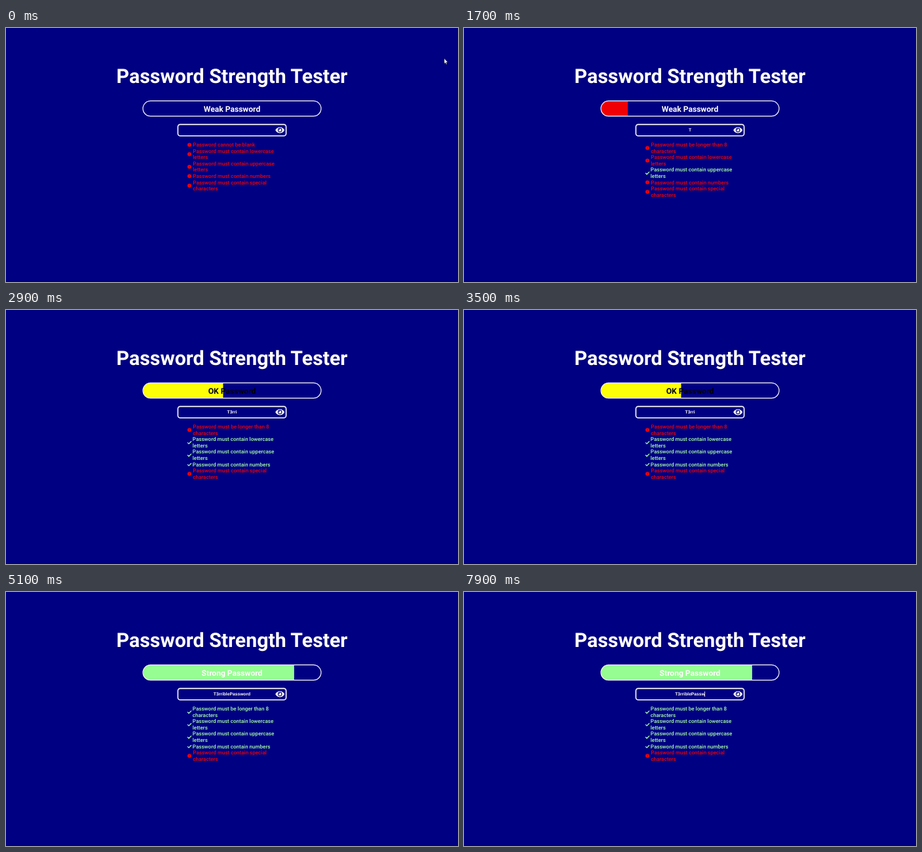
Animation, 690 px wide and 388 px high, one loop 8000 ms. Source, as an HTML page with a canvas:

```html
<!DOCTYPE html>
<html lang="en">
<head>
<meta charset="utf-8">
<title>Password Strength Tester</title>
<style>
html, body { margin: 0; width: 100%; height: 100%; overflow: hidden; background: #000082; }
canvas { display: block; width: 690px; height: 388px; }
</style>
</head>
<body>
<canvas id="stage" width="690" height="388"></canvas>
<script>
const ctx = document.getElementById('stage').getContext('2d');
ctx.textRendering = 'geometricPrecision';
const LOOP = 8000, MID = 345;
const NAVY = '#000082', WHITE = '#fffffa', RED = '#f00004', YELLOW = '#fdff08', GREEN = '#96fd92', MINT = '#a8ffa8';
const ROBOTO = 'Roboto, sans-serif', ARIAL = '"Liberation Sans", Arial, sans-serif';

// Each entry: time and number of characters in the field.
const PHRASE = 'T3rriblePassword';
const KEYS = [[0, 0], [1500, 1], [2200, 2], [2600, 3], [2700, 4], [2900, 5], [3700, 6], [3800, 7],
  [3900, 8], [4100, 9], [4300, 12], [4500, 13], [4700, 14], [4900, 15], [5000, 16],
  [7500, 15], [7700, 14], [7900, 13]];
const CARET = [[1000, 1500], [2200, 2500], [3100, 3500], [5600, 6100], [6600, 7100], [7500, 8000]];

function text(str, x, y, font, color, align = 'center') {
  ctx.font = font;
  ctx.fillStyle = color;
  ctx.textAlign = align;
  ctx.fillText(str, x, y);
}

function pill(x, y, w, h, r) {
  ctx.beginPath();
  ctx.roundRect(x, y, w, h, r);
}

function dot(x, y, r, color) {
  ctx.fillStyle = color;
  ctx.beginPath();
  ctx.arc(x, y, r, 0, Math.PI * 2);
  ctx.fill();
}

function meter(value) {
  let share = 0;
  if (/[a-z]/.test(value)) share += 15;
  if (/[A-Z]/.test(value)) share += 15;
  if (/\d/.test(value)) share += 15;
  if (value.length > 9) share += 40;
  const [word, fill, ink] = share > 60 ? ['Strong', GREEN, WHITE]
    : share > 30 ? ['OK', YELLOW, '#00000c'] : ['Weak', RED, WHITE];

  ctx.save();
  pill(209, 111.4, 272, 23.3, 11.65);
  ctx.clip();
  ctx.fillStyle = fill;
  ctx.fillRect(209.5, 111, 271 * share / 100, 25);
  ctx.restore();
  pill(209, 111.4, 272, 23.3, 11.65);
  ctx.strokeStyle = WHITE;
  ctx.lineWidth = 1.2;
  ctx.stroke();
  text(word + ' Password', MID, 127.7, 'bold 12.1px ' + ROBOTO, ink);
}

function eye(x, y) {
  ctx.fillStyle = WHITE;
  ctx.beginPath();
  ctx.moveTo(x - 7, y);
  ctx.bezierCurveTo(x - 4, y - 6, x + 4, y - 6, x + 7, y);
  ctx.bezierCurveTo(x + 4, y + 6, x - 4, y + 6, x - 7, y);
  ctx.fill();
  dot(x, y, 3.3, NAVY);
  dot(x, y, 2.2, WHITE);
  dot(x - 0.9, y - 0.9, 0.8, NAVY);
}

function field(value, caret) {
  pill(262.4, 147.4, 165.2, 17.4, 3.5);
  ctx.strokeStyle = WHITE;
  ctx.lineWidth = 1.6;
  ctx.stroke();
  text(value, MID, 158, 'bold 6.72px ' + ARIAL, WHITE);
  if (caret) {
    const x = MID + ctx.measureText(value).width / 2;
    ctx.fillStyle = '#d8d8f0';
    ctx.fillRect(Math.floor(x), 152, 1, 8);
  }
  eye(418.2, 155.9);
}

function mark(y, ok) {
  if (!ok) {
    dot(280, y, 3, RED);
    ctx.fillStyle = '#a80018';
    ctx.fillRect(279.6, y - 1.8, 0.8, 2.2);
    ctx.fillRect(279.6, y + 1, 0.8, 0.8);
    return;
  }
  ctx.strokeStyle = MINT;
  ctx.lineWidth = 1.3;
  ctx.beginPath();
  ctx.moveTo(277.1, y);
  ctx.lineTo(279.1, y + 2);
  ctx.lineTo(283, y - 1.9);
  ctx.stroke();
}

function rules(value) {
  const must = 'Password must contain ';
  const rows = [
    value ? [value.length > 8, 'Password must be longer than 8', 'characters'] : [false, 'Password cannot be blank'],
    [/[a-z]/.test(value), must + 'lowercase', 'letters'],
    [/[A-Z]/.test(value), must + 'uppercase', 'letters'],
    [/\d/.test(value), must + 'numbers'],
    [/[^a-z\d]/i.test(value), must + 'special', 'characters']
  ];
  const step = 9.56;
  let y = 178.5;
  for (const [ok, ...lines] of rows) {
    mark(y + (lines.length - 1) * step / 2, ok);
    for (const line of lines) {
      text(line, ok ? 284.8 : 285.3, y + 2.7, '500 8.05px ' + ROBOTO, ok ? MINT : RED, 'left');
      y += step;
    }
  }
}

function pointer(t) {
  if (t >= 900) return;
  const p = t / 900, e = p * p * (3 - 2 * p);
  ctx.save();
  ctx.translate(669 - 309 * e, 46.5 + 107 * e);
  ctx.beginPath();
  for (const [x, y] of [[0, 0], [0, 8], [1.8, 6.4], [3, 9.2], [4.2, 8.6], [3.1, 6], [5.4, 5.8]]) ctx.lineTo(x, y);
  ctx.closePath();
  ctx.fillStyle = WHITE;
  ctx.fill();
  ctx.strokeStyle = '#000020';
  ctx.lineWidth = 0.5;
  ctx.stroke();
  ctx.restore();
}

function draw(t) {
  const count = KEYS.filter(k => k[0] <= t).pop()[1];
  const value = PHRASE.slice(0, count);
  ctx.fillStyle = NAVY;
  ctx.fillRect(0, 0, 690, 388);
  text('Password Strength Tester', MID, 83.5, 'bold 30.3px ' + ROBOTO, WHITE);
  meter(value);
  field(value, CARET.some(([a, b]) => t >= a && t < b));
  rules(value);
  pointer(t);
}

const start = performance.now();
function tick() {
  const t = (performance.now() - start) % LOOP;
  draw(Math.floor(t / 100) * 100);
  requestAnimationFrame(tick);
}
tick();
</script>
</body>
</html>
```
